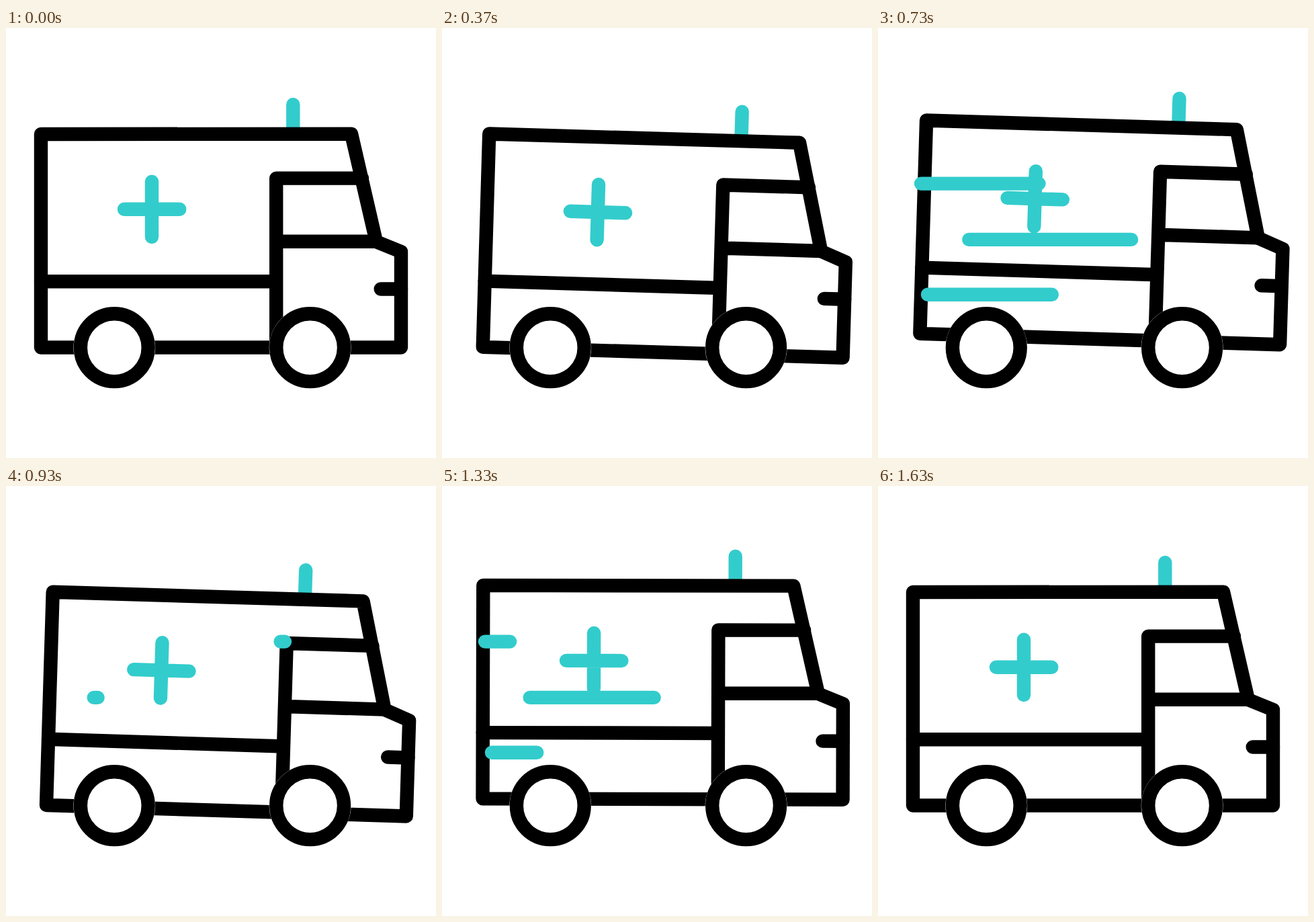
Animation of 640 by 640 pixels, one loop 1.67 s. Source, as an HTML page:

```html
<!DOCTYPE html>
<html lang="en">
<head>
<meta charset="utf-8">
<title>Ambulance</title>
<style>
html, body { margin: 0; width: 100%; height: 100%; overflow: hidden; background: #fff; }
svg { display: block; width: 100vw; height: 100vh; }
.ink { stroke: #000; }
.teal { stroke: #33cccc; }
</style>
</head>
<body>
<svg viewBox="0 0 640 640" fill="none" stroke-width="20.4" stroke-linecap="round" stroke-linejoin="round">
  <g id="van">
    <path class="teal" d="M427.3 114V157M176 269.7H258.3M217 228.6V311"/>
    <path class="ink" d="M52 158L514 157.6L551 318L588 333V475.5H52Z"/>
    <path class="ink" d="M530 223.6H402.2V475M402.2 317.7H551M52 377.2H402.2M557.7 388.5H588"/>
  </g>
  <g id="wheels"></g>
  <g id="wind"></g>
</svg>
<script>
const NS = 'http://www.w3.org/2000/svg';
const LOOP = 1670, FRAME = 100 / 3, CYCLE = 16;
const van = document.getElementById('van');

function add(parent, tag, attrs) {
  const el = document.createElementNS(NS, tag);
  for (const k in attrs) el.setAttribute(k, attrs[k]);
  return document.getElementById(parent).appendChild(el);
}

for (const cx of [161.3, 452.6]) {
  add('wheels', 'circle', { cx, cy: 475.7, r: 60.9, fill: '#fff', stroke: 'none' });
  add('wheels', 'circle', { cx, cy: 475.7, r: 50.4, class: 'ink' });
}

// Wind streaks run from right to left, each with its own delay in frames.
const streaks = [
  { y: 231.6, from: 415, to: 64, delay: 0 },
  { y: 314.9, from: 383, to: 130.7, delay: 3 },
  { y: 396.7, from: 326, to: 74, delay: 1 }
].map(s => ({ ...s, el: add('wind', 'path', { class: 'teal' }) }));

// Pose keys: frame, x, y, angle.
const poses = [
  [1, 0, 0, 0],
  [13, 13.9, 7.7, 1.78],
  [19.5, 15.3, -15.2, 1.75],
  [29, 12.6, 8.2, 1.75],
  [37.3, 16.4, -16.3, 1.75],
  [43, -0.3, -1, -1.85],
  [49, 0, 0, 0]
];

// Cubic bezier ease (.5, 0, .5, 1), solved by bisection.
function ease(t) {
  if (t <= 0) return 0;
  if (t >= 1) return 1;
  let lo = 0, hi = 1;
  for (let i = 0; i < 24; i++) {
    const s = (lo + hi) / 2;
    if (1.5 * s * (1 - s) + s * s * s < t) lo = s; else hi = s;
  }
  return lo * lo * (3 - 2 * lo);
}

function poseAt(f) {
  let i = 0;
  while (i < poses.length - 2 && f > poses[i + 1][0]) i++;
  const a = poses[i], b = poses[i + 1];
  const k = ease((f - a[0]) / (b[0] - a[0]));
  return a.map((v, n) => v + (b[n] - v) * k);
}

function drawStreak(s, f) {
  const start = 11 + s.delay;
  const n = f < start + CYCLE ? 0 : 1;
  const p = f - start - n * CYCLE;
  const head = ease(p / 9), tail = ease((p - 7) / 8);
  const x = k => (s.from + (s.to - s.from) * k).toFixed(2);
  s.el.setAttribute('d', head > tail ? `M${x(tail)} ${s.y}H${x(head)}` : '');
}

function draw(ms) {
  const f = Math.floor((ms % LOOP) / FRAME + 0.15);
  const [, x, y, angle] = poseAt(f);
  van.setAttribute('transform', `translate(${x} ${y}) rotate(${angle} 320 320)`);
  streaks.forEach(s => drawStreak(s, f));
}

let t0 = null;
function tick(now) {
  if (t0 === null) t0 = now;
  draw(now - t0);
  requestAnimationFrame(tick);
}
draw(0);
requestAnimationFrame(tick);
</script>
</body>
</html>
```
